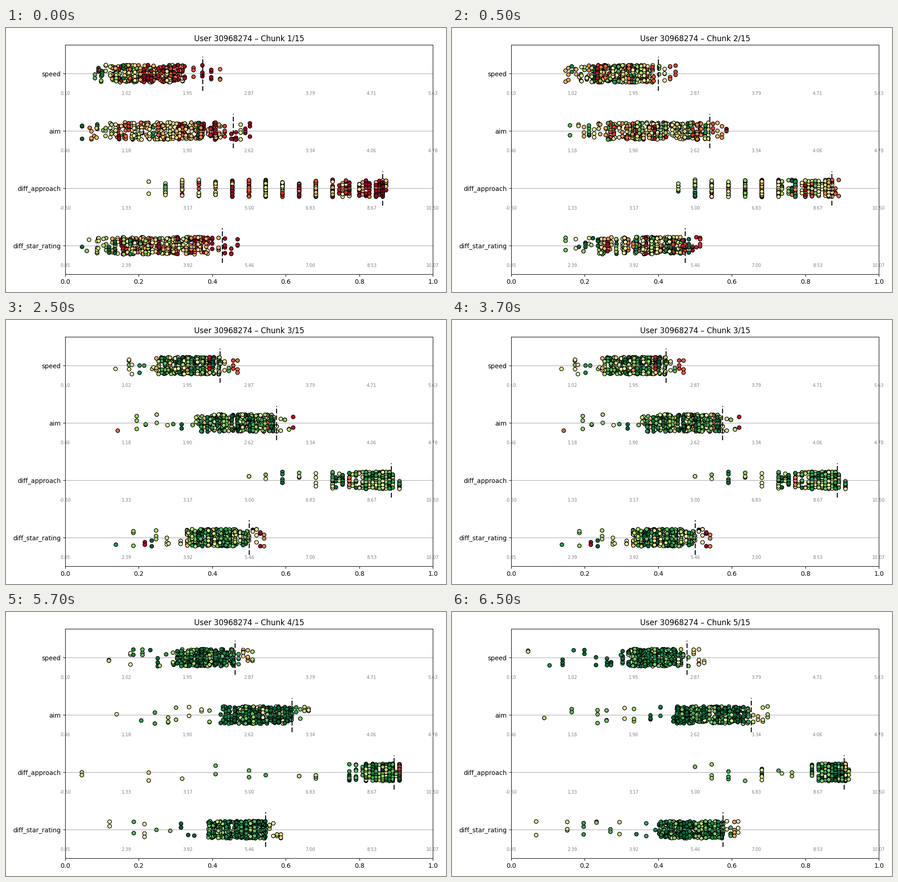
These frames come from a looping animation (966x580 px, 8000 ms). A matplotlib script:

```python
import numpy as np
import matplotlib.pyplot as plt
from matplotlib.animation import FuncAnimation

W, H, DPI = 966, 580, 100
CHUNKS = 5
JITTER = 0.15


class Feature:
    """One row; positions are fractions of the axis width.

    start, end: edges of the dense part in the first and the last chunk
    marks, firsts: dashed line and leftmost point in every chunk
    reach: distance from the dashed line to the rightmost point
    """

    def __init__(self, name, limits, start, end, marks, firsts, reach):
        self.name, self.limits = name, limits
        self.start, self.end = np.array(start), np.array(end)
        self.marks, self.firsts, self.reach = marks, firsts, reach

    def edges(self, chunk):
        """First point, dense part and last point, easing out over time."""
        ease = 1 - (1 - chunk / (CHUNKS - 1)) ** 2
        lo, hi = self.start + (self.end - self.start) * ease
        mark = self.marks[chunk]
        return self.firsts[chunk], lo, min(hi, mark), mark + self.reach


FEATURES = [
    Feature("speed", (0.103, 5.631), (0.113, 0.325), (0.300, 0.468),
            (0.3744, 0.4002, 0.4218, 0.4624, 0.4778),
            (0.081, 0.148, 0.137, 0.119, 0.046), 0.047),
    Feature("aim", (0.46, 4.78), (0.115, 0.452), (0.438, 0.645),
            (0.4575, 0.5406, 0.5751, 0.6170, 0.6527),
            (0.046, 0.160, 0.143, 0.140, 0.090), 0.045),
    Feature("diff_approach", (-0.5, 10.5), (0.318, 0.8637), (0.773, 0.909),
            (0.8633, 0.8725, 0.8867, 0.8941, 0.9052),
            (0.227, 0.4545, 0.5, 0.0455, 0.5), 0.016),
    Feature("diff_star_rating", (0.85, 10.07), (0.111, 0.400), (0.399, 0.586),
            (0.4280, 0.4729, 0.5, 0.5456, 0.5764),
            (0.046, 0.148, 0.138, 0.121, 0.068), 0.041),
]

# Mean score at the four edges of each chunk, then its spread.
SCORES = [(0.70, 0.52, 0.15, 0.00, 0.30),
          (0.75, 0.55, 0.42, 0.10, 0.27),
          (0.65, 0.75, 0.75, 0.10, 0.24),
          (0.50, 0.90, 0.87, 0.28, 0.18),
          (0.70, 0.92, 0.84, 0.45, 0.16)]


def snap(x, limits, rng):
    """Whole and half values are common, tenths only among high values."""
    lo, hi = limits
    value = lo + x * (hi - lo)
    halves = (value < 7.6) | (rng.random(len(x)) < 0.4)
    value = np.where(halves, np.round(2 * value) / 2, np.round(value, 1))
    return (value - lo) / (hi - lo)


def row_points(chunk, row):
    """Positions, offsets and scores: groups of points share x and score."""
    rng = np.random.default_rng(10 * chunk + row)
    feature = FEATURES[row]
    edges = first, lo, hi, last = feature.edges(chunk)
    stepped = feature.name == "diff_approach"

    lean = 1.2 + chunk / 2 if stepped else 1.4
    dense = lo + (hi - lo) * rng.beta(lean, 0.8 if stepped else 1.3, 95)
    left = first + (lo - first) * np.linspace(0, 1, 9) ** 0.7
    left[1:] += rng.normal(0, 0.006, 8)
    right = np.linspace(last, hi, 5)
    x = np.concatenate([dense, left, right])
    sizes = np.concatenate([np.full(95, 4), rng.integers(1, 4, 9),
                            rng.integers(2, 5, 5)])

    *means, sd = SCORES[chunk]
    scores = np.clip(rng.normal(np.interp(x, edges, means), sd), 0, 1)
    if stepped:
        x = snap(x, feature.limits, rng)
    offsets = rng.uniform(-JITTER, JITTER, sizes.sum())
    return np.repeat(x, sizes), offsets, np.repeat(scores, sizes)


fig, ax = plt.subplots(figsize=(W / DPI, H / DPI), dpi=DPI)


def draw_row(chunk, row):
    feature = FEATURES[row]
    x, offsets, scores = row_points(chunk, row)
    ax.axhline(row, color="gray", lw=0.8, alpha=0.7)
    ax.scatter(x, row + offsets, c=scores, cmap="RdYlGn", vmin=0, vmax=1,
               s=35, edgecolors="black", linewidths=1)
    mark = feature.marks[chunk]
    ax.plot([mark, mark], [row + 0.3, row - 0.3], color="black", lw=1.5,
            ls=(0, (4.93, 2.13)))
    for t, value in zip(np.linspace(0, 1, 7),
                        np.linspace(*feature.limits, 7)):
        ax.text(t, row + 0.35, f"{value:.2f}", fontsize=7, color="gray",
                ha="center", va="center")


def draw(frame):
    chunk = (frame + 3) // 4
    ax.clear()
    ax.set(xlim=(0, 1), ylim=(3.5, -0.5))
    ax.set_yticks(range(4), [feature.name for feature in FEATURES])
    ax.set_title(f"User 30968274 – Chunk {chunk + 1}/15")
    for row in range(4):
        draw_row(chunk, row)
    fig.tight_layout()


anim = FuncAnimation(fig, draw, frames=16, interval=500, repeat=True,
                     init_func=lambda: draw(0))
plt.show()
```
